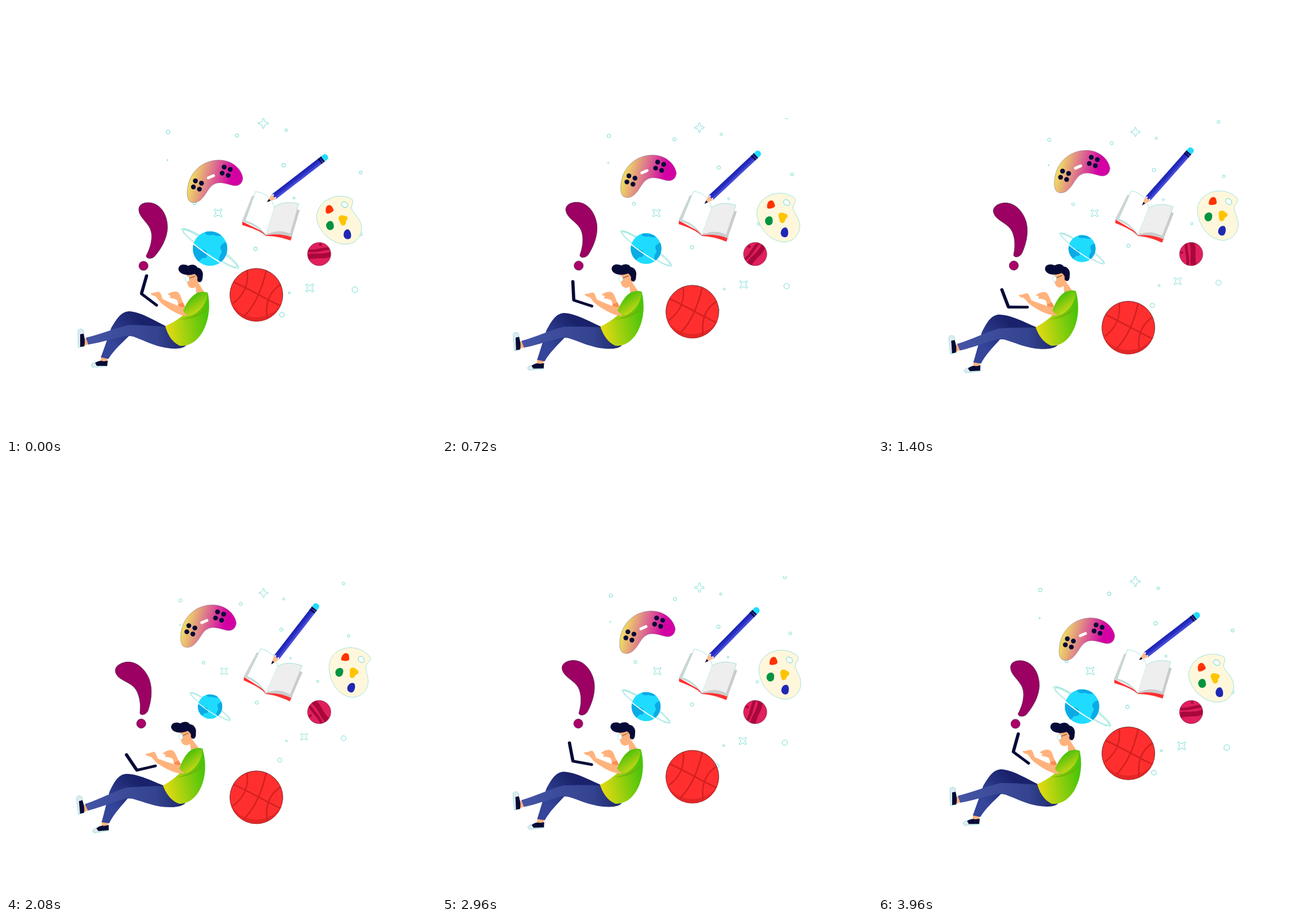
Animation, 748 px wide and 748 px high, one loop 4000 ms. Source, as an HTML page:

```html
<!DOCTYPE html>
<html lang="en">
<head>
<meta charset="utf-8">
<title>Floating ideas</title>
<style>
html, body { margin: 0; width: 100%; height: 100%; overflow: hidden; background: #fff; }
svg { display: block; width: 100vw; height: 100vh; }
.thin { stroke: #45cfc4; stroke-width: .8; }
.edge { stroke: #5fd3c6; stroke-width: .8; stroke-dasharray: 2 1; }
.navy { fill: #060a36; }
.skin { fill: #ffb27c; }
</style>
</head>
<body>
<svg viewBox="0 0 748 748">
  <defs>
    <linearGradient id="padFill" gradientUnits="userSpaceOnUse" x1="319" y1="300" x2="388" y2="318">
      <stop stop-color="#f0e45f"/><stop offset=".5" stop-color="#dd758d"/><stop offset="1" stop-color="#d400a4"/>
    </linearGradient>
    <linearGradient id="shirtFill" gradientUnits="userSpaceOnUse" x1="280" y1="560" x2="350" y2="550">
      <stop stop-color="#e2da12"/><stop offset="1" stop-color="#4cc50a"/>
    </linearGradient>
    <linearGradient id="sleeveFill" gradientUnits="userSpaceOnUse" x1="338" y1="534" x2="322" y2="508">
      <stop stop-color="#d5d818"/><stop offset="1" stop-color="#52c20a"/>
    </linearGradient>
    <linearGradient id="farLeg" gradientUnits="userSpaceOnUse" x1="185" y1="585" x2="232" y2="545">
      <stop stop-color="#34459a"/><stop offset="1" stop-color="#19226a"/>
    </linearGradient>
    <linearGradient id="nearLeg" gradientUnits="userSpaceOnUse" x1="140" y1="580" x2="305" y2="580">
      <stop stop-color="#4555a6"/><stop offset=".75" stop-color="#33438f"/><stop offset="1" stop-color="#222b70"/>
    </linearGradient>
    <clipPath id="sky"><path d="M0 195H748V748H0Z"/></clipPath>
    <clipPath id="disc"><circle r="20"/></clipPath>
    <clipPath id="globeClip"><circle r="30"/></clipPath>
  </defs>

  <g clip-path="url(#sky)"><g id="sparks" class="thin" fill="#fff"></g></g>

  <g id="gamepad">
    <path fill="url(#padFill)" stroke="#8d6a8c" stroke-width=".6" d="M322 341C312 338 314 312 322 297C333 277 352 268 371 268C392 268 409 282 412 299C411 311 403 314 394 312C382 309 370 304 360 311C349 318 344 342 326 342Z"/>
    <path stroke="#fff" stroke-width="5" stroke-linecap="round" d="M352 299L361 295"/>
    <g id="buttons" class="navy"></g>
  </g>

  <g id="globe">
    <ellipse rx="60" ry="10" fill="none" class="thin" transform="rotate(34.5)"/>
    <ellipse rx="57" ry="7.5" fill="none" class="thin" transform="rotate(34.5)"/>
    <circle r="30" fill="#1fdcff"/>
    <g clip-path="url(#globeClip)" fill="#0aabe5">
      <path d="M-9-31C-10-24-2-22 5-24C12-21 20-22 24-23L18-34Z"/>
      <path d="M32-12C22-11 14-4 20 3C22 10 12 13 17 23L27 24Z"/>
      <path d="M-32-6C-24-7-19-3-16 1C-9 2-4 4-6 9C-3 15-8 18-13 16L-22 25L-33 8Z"/>
    </g>
    <path d="M-58 2A58 8.7 0 0 0 58 2" transform="rotate(34.5)" fill="none" stroke="#fff" stroke-width="2"/>
  </g>

  <g id="book">
    <path fill="#ff3030" d="M411 375L411 381C430 387 442 391 452 400C466 400 482 403 495 408L498 399L452 395Z"/>
    <path fill="#d2d4d4" d="M428 330L435 331L418 374C434 379 444 388 452 399C442 388 428 379 410 375Z"/>
    <path fill="#cacccc" d="M504 353L511 355L497 402C482 397 468 396 452 399C464 390 480 390 493 394Z"/>
    <path class="edge" fill="#fff" d="M434 323C450 324 462 334 467 350L452 399C445 388 432 377 416 374Z"/>
    <path fill="#eee" d="M467 350C478 341 493 340 509 344L494 396C478 389 462 390 452 399Z"/>
    <path class="edge" fill="none" d="M467 350C478 341 493 340 509 344L506 354"/>
  </g>

  <g id="pencil">
    <path fill="#ffb98b" d="M-41 0L-26-5.500V5.500Z"/>
    <path class="navy" d="M-41 0L-35-2.200V2.200Z"/>
    <path fill="#1f27b5" d="M-26-5.500H82V0H-26L-23-3Z"/>
    <path fill="#4549d6" d="M-26 0H82V5.500H-26L-23 3Z"/>
    <path fill="#2b30c4" d="M-26-1.800H82V1.800H-26Z"/>
    <path stroke="#060a36" stroke-width="2.400" d="M76-5.500V5.500M80.500-5.500V5.500"/>
    <path fill="#20dcff" d="M82-5.500H87C93-5 93 5 87 5.500H82Z"/>
  </g>

  <g id="palette">
    <path class="edge" fill="#fff7dc" d="M600 319.500C612 320 622 324 632 334C637 340 631 344 627 349C624 355 629 364 630 376C631 393 618 406 602 406C580 404 562 381 562 353C562 332 580 319 600 319.500Z"/>
    <ellipse class="thin" cx="618" cy="340" rx="4.500" ry="6" fill="#fff" transform="rotate(-38 618 340)"/>
    <path fill="#ff3300" d="M583 340C583 335 587 329 591 329C597 329 597 334 597 340C596 344 583 343 583 340Z"/>
    <path fill="#009440" d="M573 363C573 357 578 354 583 355C588 357 587 362 585 367C582 372 573 371 573 363Z"/>
    <path fill="#ffc400" d="M598 358C600 353 606 353 609 357C615 360 615 365 608 367C606 374 598 374 598 368Z"/>
    <path fill="#2028b4" d="M594 388C596 382 602 379 606 382C609 387 606 395 603 397C598 399 592 394 594 388Z"/>
  </g>

  <g id="candy">
    <circle r="20.300" fill="#e11f5d" stroke="#71304a" stroke-width=".6"/>
    <g clip-path="url(#disc)" fill="#a9083c">
      <path d="M-22 1C-10-4 3 3 22-5V4C8 11-4 4-22 11Z"/>
      <path d="M-22-9C-8-5 4-13 22-12V-7C8-8-4-1-22-4Z"/>
      <circle cx="2" cy="-16.500" r="2.500"/>
    </g>
  </g>

  <g id="ball">
    <circle r="46" fill="#ff2f2f" stroke="#5c2a2c" stroke-width=".9"/>
    <path fill="#e32626" d="M-46 0A46 46 0 0 0 46 0A46 39 0 0 1-46 0Z"/>
    <path fill="none" stroke="#d51f20" stroke-width="2.600" d="M-39-22C-15-12 17 8 42 19M17-42C11-15 0 16-21 37M-16-42C-13-19-22 1-41 15M42-18C22-5 15 15 19 41"/>
  </g>

  <g id="exclaim" fill="#9b0062" stroke="#5b2850" stroke-width=".8">
    <path d="M231 354C231 346 238 342 247 342C268 342 281 362 281 386C280 405 270 422 259 435C254 441 243 440 244 434C249 425 255 410 253 395C251 378 231 369 231 354Z"/>
    <circle cx="239.200" cy="452" r="8" fill="#ab0069"/>
  </g>

  <g id="person">
    <path class="skin" d="M165 609L177 611L175 619H165ZM143 577L135 579L136 591L144 588Z"/>
    <path fill="url(#farLeg)" d="M280 558C258 547 236 533 215 531C200 531 192 545 183 560C177 577 171 595 165 611L178 614C188 598 200 588 214 574L275 580Z"/>
    <path fill="url(#nearLeg)" d="M277 558C255 556 233 555 213 555C190 560 165 571 139 577L143 589C167 585 190 577 215 573C239 580 260 595 292 596C302 596 308 595 313 591L300 570Z"/>
    <path class="edge" fill="#dfeaf0" d="M125 566C125 561 134 560 135 566L136 592L126 594Z"/>
    <path class="navy" d="M129 571L135 570C137 578 138 585 136 592L129 593Z"/>
    <path class="edge" fill="#dfeaf0" d="M148 625C149 621 154 620 159 619L176 624L176 627L150 628.500Z"/>
    <path class="navy" d="M155 621C159 618 163 617 166 617C170 619 174 617 177 617L176 626L158 626Z"/>

    <path class="skin" d="M281 502C284 499 291 496 297 497C303 499 304 506 307 514L312 523L301 525L298 512C294 509 289 508 284 508C288 505 286 503 281 502Z"/>
    <path fill="#f78d52" d="M299 519L308 516L311 524L301 525Z"/>
    <path class="skin" d="M333 479L345 498L331 503L330 488Z"/>
    <path fill="url(#shirtFill)" d="M331 500C337 497 345 496 351 499C356 522 353 546 343 565C334 582 319 593 302 591C288 584 281 571 277 557C286 553 297 547 308 538Z"/>
    <path fill="#6eae08" opacity=".75" d="M300 545C320 543 338 536 353 522C344 538 325 546 300 545Z"/>
    <path class="skin" d="M316 539C303 540 285 529 270 517C266 513 263 508 260 505C256 504 251 502 252 499C257 500 262 497 266 497C271 500 270 506 273 510C284 515 298 522 311 525Z"/>
    <path fill="url(#sleeveFill)" d="M331 500C322 505 314 516 308 530C312 537 318 540 323 538C340 530 350 515 350 501C345 497 337 497 331 500Z"/>

    <path class="skin" d="M315 467L332 464C334 473 335 480 335 484C330 490 324 493 319 489C315 486 314 478 315 467Z"/>
    <path class="navy" d="M300 458C300 449 310 448 317 452C322 449 330 449 333 455C341 456 344 465 342 471C342 480 337 483 333 478C333 473 333 469 328 466C318 470 302 468 300 458Z"/>
    <circle class="skin" cx="330" cy="473" r="3"/>
    <path stroke="#6c4537" stroke-width="1" d="M318 474L329 470"/>
    <ellipse class="edge" cx="315.500" cy="475" rx="3.500" ry="5" fill="#fff"/>
  </g>

  <g id="laptop" fill="none" stroke="#060a36" stroke-linecap="round">
    <path stroke-width="5.600" d="M244.500 469.500L236 499"/>
    <path stroke-width="4.800" d="M235.500 500.500L262 520.500"/>
  </g>
</svg>
<script>
const FRAME = 40, LOOP = 4000, HALF = 1990;
const part = id => document.getElementById(id);
const move = (id, transform) => part(id).setAttribute('transform', transform);

// Rings: x, y, radius
const rings = [
  [282, 219, 3.2], [402, 225.5, 3], [487.5, 216, 2.2], [281, 268, 1], [483, 277, 3.2],
  [617, 289.5, 2.6], [501, 334, 1.7], [328, 343, 2.8], [434, 422.5, 3.2], [607, 493.5, 5],
  [493, 499, 1.8], [480, 537, 4.2], [607, 185, 2.8], [555.5, 380, 2.3], [617, 397, 2.6]
];
const sparkPath = 'M-1.300-8C-1-9.300 1-9.300 1.300-8C1.500-3 3-1.500 8-1.300C9.300-1 9.300 1 8 1.300C3 1.500 1.500 3 1.300 8C1 9.300-1 9.300-1.300 8C-1.500 3-3 1.500-8 1.300C-9.300 1-9.300-1-8-1.300C-3-1.500-1.500-3-1.300-8Z';
const spark = (x, y, turn) => `<path d="${sparkPath}" transform="translate(${x} ${y}) rotate(${turn})"/>`;
const circle = ([x, y, r]) => `<circle cx="${x}" cy="${y}" r="${r}"/>`;

part('sparks').innerHTML = rings.map(circle).join('') +
  spark(447.5, 204, 0) + spark(369, 360, 45) + spark(528.5, 490.5, 45);

part('buttons').innerHTML = [[333, 311.4], [383, 287.4]].flatMap(([x, y]) =>
  [[-3.5, -7.2], [7, -3.2], [-7, 3.4], [3.5, 7.2]].map(([dx, dy]) => circle([x + dx, y + dy, 4.2]))
).join('');

function pose(time) {
  const step = Math.floor(time % LOOP / FRAME) * FRAME;
  const p = 1 - Math.abs(step - HALF) / HALF;
  const shrink = 1 - .133 * p;
  move('sparks', `translate(451 364) scale(${shrink}) translate(-451 -364)`);
  move('gamepad', `translate(${-12 * p} ${-24 * p})`);
  move('globe', `translate(355 422) scale(${1 - .305 * p})`);
  move('book', `rotate(${7 * p} 452 399)`);
  move('pencil', `translate(486.5 316) rotate(${-37.6 - 15.4 * p})`);
  move('palette', `rotate(${26.2 * p - 25} 616 408.5)`);
  move('candy', `translate(544.8 431.5) rotate(${-125 * p})`);
  move('ball', `translate(435.5 ${502.5 + 81 * p})`);
  move('exclaim', `rotate(${-23 * p} 236 462)`);
  move('person', `rotate(${-5.3 * p} 302 602)`);
  move('laptop', `rotate(${-52.5 * p} 266 525)`);
}

const start = performance.now();
function tick() {
  pose(performance.now() - start);
  requestAnimationFrame(tick);
}
tick();
</script>
</body>
</html>
```
